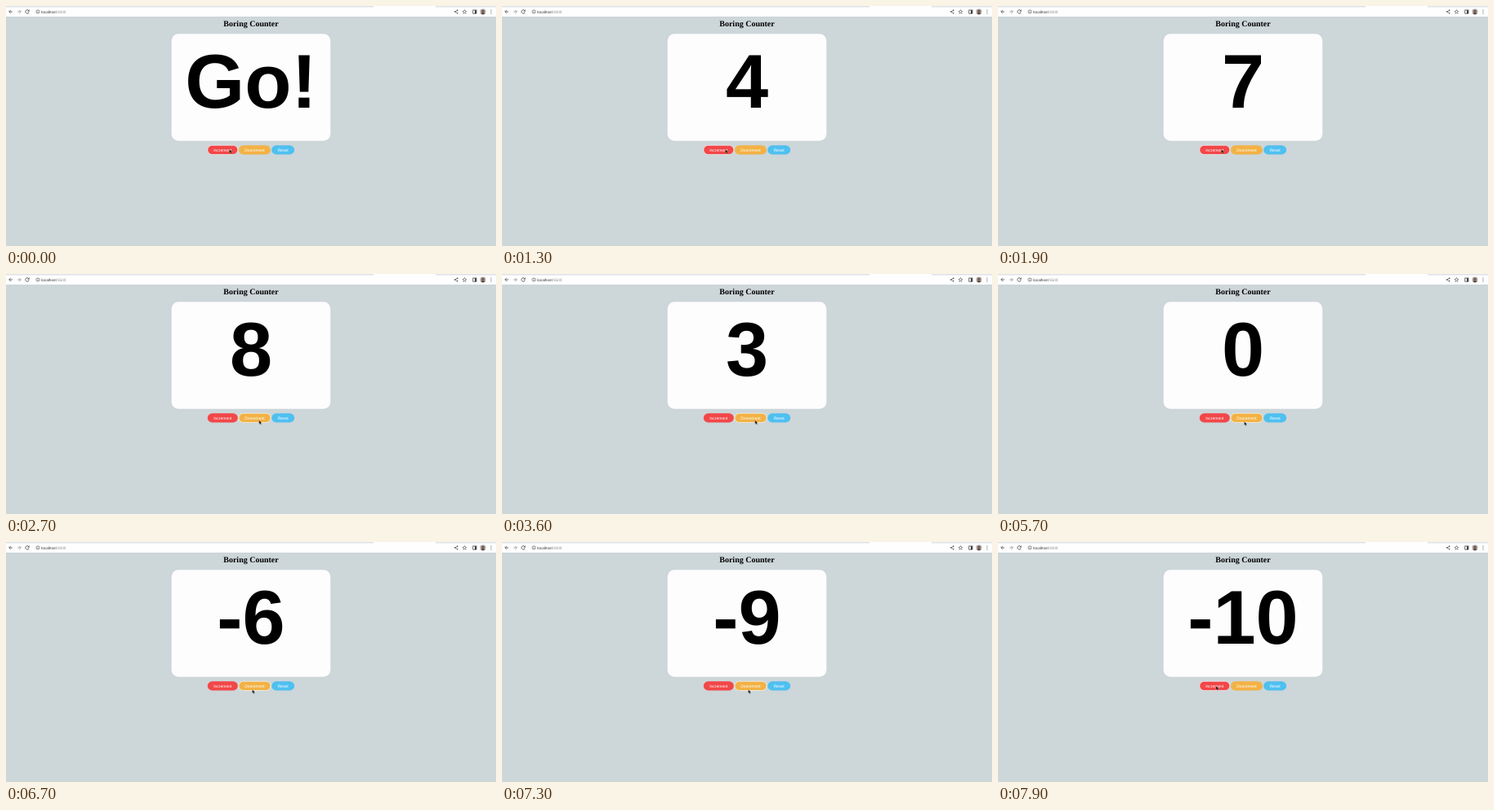
An HTML page that plays this animation: 600 by 295 pixels, repeating every 8 s.

```html
<!DOCTYPE html>
<html lang="en">
<head>
<meta charset="utf-8">
<title>Boring Counter</title>
<style>
  html, body { margin: 0; width: 100%; height: 100%; overflow: hidden; background: #cdd6d9; }
  svg { display: block; width: 600px; height: 295px; }
  text { font-family: "Liberation Sans", Arial, sans-serif; text-rendering: geometricPrecision; }
  .mid { text-anchor: middle; }
  #title { font: bold 10px "Liberation Serif", "Times New Roman", serif; }
  #count { font-size: 93.75px; font-weight: bold; }
  .btn text { font-size: 5px; fill: #fff; }
  .btn rect { stroke: none; }
  .btn.hover rect { stroke: #fff; stroke-width: .7; stroke-opacity: .85; }
  .icon { fill: none; stroke: #45484c; stroke-width: .8; }
  .thin { stroke-width: .6; }
</style>
</head>
<body>
<svg viewBox="0 0 600 295">
  <rect width="600" height="13" fill="#fefefe"/>
  <path d="M0 0H450V1.4H0ZM526 0H600V1.4H526Z" fill="#dfe2e6"/>

  <g class="icon">
    <path d="M8 7H3.8M5.8 4.9L3.7 7L5.8 9.1"/>
    <path d="M14 7H18.2M16.2 4.9L18.3 7L16.2 9.1" stroke="#8d9094"/>
    <path d="M27.8 5.6A2.2 2.2 0 1 0 28.2 7.5M28.3 4.6V6.3H26.5"/>
    <circle class="thin" cx="39" cy="7" r="2.1"/>
    <path class="thin" d="M39 6.7V8.3M39 5.6V6.1"/>
    <path class="thin" d="M552.7 5.4L549.7 7L552.7 8.7"/>
    <path class="thin" d="M561.5 4.6L562.2 6.3L564 6.4L562.6 7.6L563.1 9.3L561.5 8.4L559.9 9.3L560.4 7.6L559 6.4L560.8 6.3Z"/>
    <rect x="571.8" y="5" width="4.2" height="4.2"/>
  </g>
  <g fill="#45484c">
    <circle cx="552.7" cy="5.4" r=".8"/><circle cx="549.7" cy="7" r=".8"/><circle cx="552.7" cy="8.7" r=".8"/>
    <rect x="574" y="5" width="2" height="4.2"/>
    <circle cx="594" cy="5" r=".55"/><circle cx="594" cy="7" r=".55"/><circle cx="594" cy="9" r=".55"/>
  </g>
  <circle cx="584" cy="7" r="3.4" fill="#a9a29c"/>
  <path d="M581.5 9.3Q584 6.8 586.5 9.3Q584 11.5 581.5 9.3Z" fill="#5b4a43"/>
  <circle cx="584" cy="6.2" r="1.5" fill="#6b5148"/>
  <text x="43.2" y="8.8" font-size="4.7" fill="#303336">localhost<tspan fill="#8b8e92">:5500</tspan></text>

  <text id="title" class="mid" x="300" y="25">Boring Counter</text>
  <rect x="202.7" y="34.3" width="194.6" height="131.4" rx="8.5" fill="#fdfdfe"/>
  <text id="count" class="mid" x="300" y="124.5"></text>

  <g id="buttons"></g>
  <path id="cursor" d="M0 0V4.6L1.1 3.7L1.9 5.4L2.8 5L2 3.4H3.5Z" fill="#111" stroke="#fff" stroke-width=".2"/>
</svg>
<script>
const LOOP = 8000;
const BEAT = 172; // time between repeated clicks
const BUTTONS = [
  { label: "Increment", x: 246.8, w: 37, fill: "#f24748" },
  { label: "Decrement", x: 285, w: 39, fill: "#f2b245" },
  { label: "Reset", x: 325.2, w: 28, fill: "#4fc0f0" }
];
// Each run of clicks counts one step per beat.
const RUNS = [
  { start: 390, from: 1, to: 1 },
  { start: 880, from: 2, to: 9 },
  { start: 2690, from: 8, to: 2 },
  { start: 4490, from: 0, to: 0 },
  { start: 5790, from: -1, to: -10 }
];
const HOME = [273.6, 176.2];
const MOVES = [
  { start: 2250, end: 2600, to: [309.8, 179.8] },
  { start: 3850, end: 4100, to: [348, 180] },
  { start: 5250, end: 5600, to: [301.6, 181.4] },
  { start: 7550, end: 7850, to: [267, 177] }
];

const $ = id => document.getElementById(id);
const count = $("count"), cursor = $("cursor");

$("buttons").innerHTML = BUTTONS.map(({ label, x, w, fill }) =>
  `<g class="btn"><rect x="${x}" y="171.3" width="${w}" height="11.2" rx="5.6" fill="${fill}"/>
   <text class="mid" x="${x + w / 2}" y="178.5">${label}</text></g>`).join("");
const groups = [...document.querySelectorAll(".btn")];

const clamp = p => Math.min(1, Math.max(0, p));
const ease = p => p * p * (3 - 2 * p);

function valueAt(t) {
  const run = RUNS.filter(r => r.start <= t).pop();
  if (!run) return "Go!";
  const clicks = Math.floor((t - run.start) / BEAT);
  const span = run.to - run.from;
  return String(run.from + Math.sign(span) * Math.min(clicks, Math.abs(span)));
}

function cursorAt(t) {
  return MOVES.reduce((pos, { start, end, to }) => {
    const k = ease(clamp((t - start) / (end - start)));
    return pos.map((v, i) => v + (to[i] - v) * k);
  }, HOME);
}

function draw(t) {
  const value = valueAt(t);
  if (count.textContent !== value) count.textContent = value;
  const [x, y] = cursorAt(t);
  cursor.setAttribute("transform", `translate(${x} ${y})`);
  BUTTONS.forEach((b, i) =>
    groups[i].classList.toggle("hover", x >= b.x && x <= b.x + b.w));
}

function tick() {
  draw(performance.now() % LOOP);
  requestAnimationFrame(tick);
}
tick();
</script>
</body>
</html>
```
